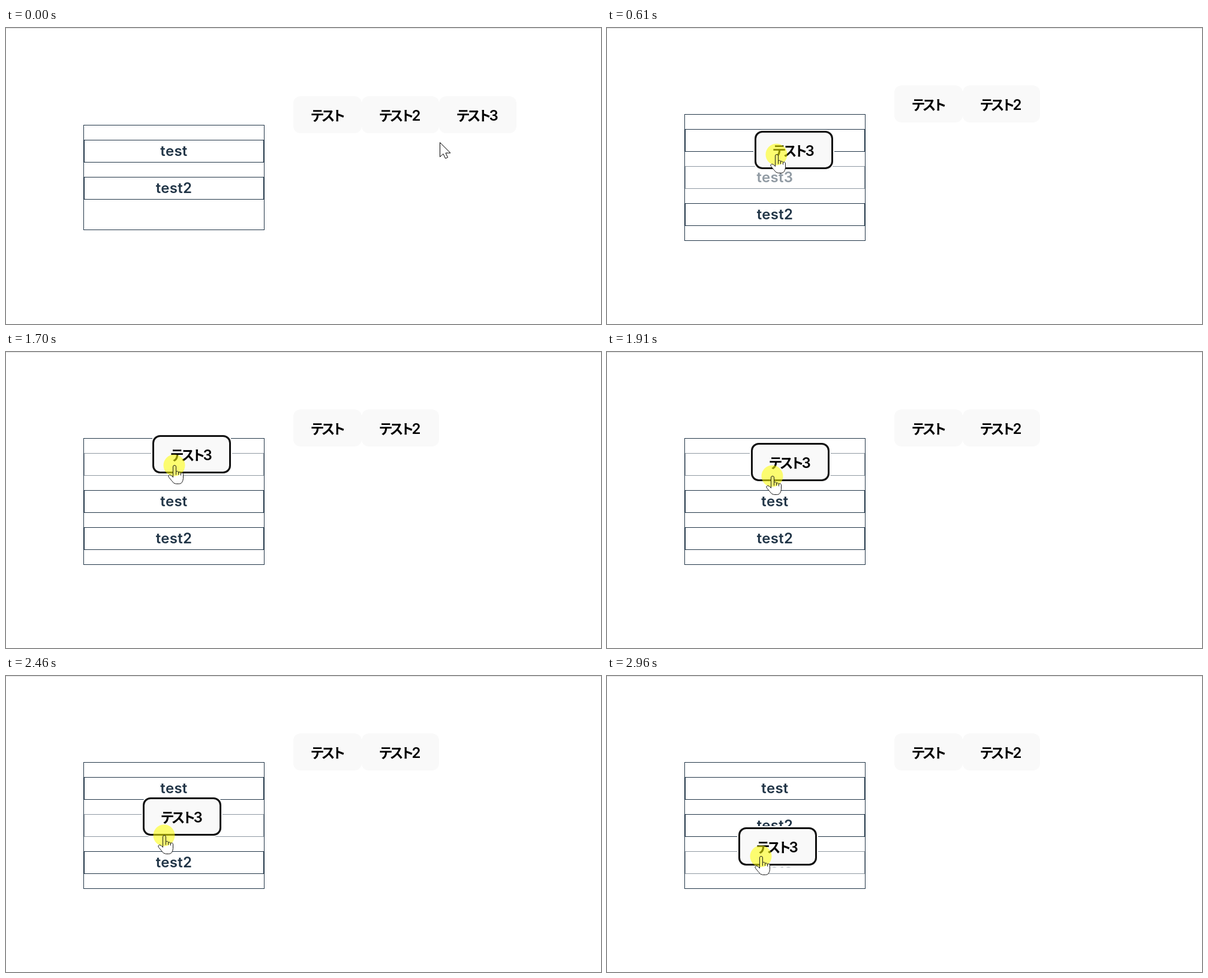
An HTML page with a canvas that plays this animation: 992x495 px, repeating every 3.28 s.

```html
<!DOCTYPE html>
<html lang="ja">
<head>
<meta charset="utf-8">
<title>Drag and drop list</title>
<style>
html, body { margin: 0; width: 100%; height: 100%; overflow: hidden; background: #fff; }
canvas { display: block; }
</style>
</head>
<body>
<canvas id="stage" width="992" height="495"></canvas>
<script>
const ctx = document.getElementById('stage').getContext('2d');
const LOOP = 3280;
const STEPS = 48;
const LEAD = 10;
const INK = '#213547';
const GRAB = { x: 36, y: 47 };
const ROW_STEP = 62;

// Where the pointer pauses or turns, timed in steps.
const stops = [
  { at: 0, x: 715, y: 174 },
  { at: 2, x: 303, y: 226 },
  { at: 4, x: 283, y: 220 },
  { at: 8, x: 283, y: 220 },
  { at: 11, x: 281, y: 187 },
  { at: 24, x: 281, y: 187 },
  { at: 31.6, x: 270, y: 225 },
  { at: 32, x: 270, y: 225 },
  { at: 39, x: 258, y: 292 },
  { at: 40, x: 258, y: 292 },
  { at: 42, x: 256, y: 301 }
];

const arrow = new Path2D('M0 0V24L5.5 19L9 26.5L13 25L9.5 17.5H17.5Z');
const hand = new Path2D(
  'M-2 20V2.5Q-2 0 .5 0Q3 0 3 2.5V11Q5 8.5 7 11V12Q9.5 10 11 13Q15 11.5 15 15.5V22' +
  'Q14 31 8 31H3Q-1 31 -4 26L-9 20Q-11 17 -8 16Q-5 15.5 -2 20Z');
const knuckles = new Path2D('M3 11V16M7 12V16M11 13V17');

const smooth = u => u * u * (3 - 2 * u);

function pointerAt(step) {
  const next = stops.findIndex(s => s.at > step);
  if (next < 0) return stops[stops.length - 1];
  const a = stops[next - 1];
  const b = stops[next];
  const k = smooth((step - a.at) / (b.at - a.at));
  return {
    x: Math.round(a.x + (b.x - a.x) * k),
    y: Math.round(a.y + (b.y - a.y) * k)
  };
}

function fillRound(x, y, w, h, r, color) {
  ctx.beginPath();
  ctx.roundRect(x, y, w, h, r);
  ctx.fillStyle = color;
  ctx.fill();
}

function frame(x, y, w, h) {
  ctx.strokeStyle = INK;
  ctx.lineWidth = 1;
  ctx.strokeRect(x + 0.5, y + 0.5, w - 1, h - 1);
}

function text(str, x, y, font, color, spacing = 0) {
  ctx.font = font;
  ctx.letterSpacing = spacing + 'px';
  ctx.fillStyle = color;
  ctx.fillText(str, x, y);
}

function row(y, label, alpha) {
  ctx.globalAlpha = alpha;
  frame(130, y, 300, 38);
  ctx.textAlign = 'center';
  text(label, 280, y + 27, '600 24px Inter, sans-serif', INK, 0.3);
  ctx.globalAlpha = 1;
}

function buttonText(x, y, digit) {
  ctx.textAlign = 'left';
  text('テスト', x + 28.5, y + 41, '700 23px "Noto Sans CJK JP", "Noto Sans CJK", sans-serif', '#000', -5);
  text(digit, x + 83.5, y + 41, '600 24px Inter, sans-serif', '#000');
}

function button(x, y, digit, alpha = 1) {
  ctx.globalAlpha = alpha;
  fillRound(x, y, digit ? 129 : 114, 62, 12, '#f9f9f9');
  buttonText(x, y, digit);
  ctx.globalAlpha = 1;
}

function draggedButton(x, y) {
  const ring = (grow, color) =>
    fillRound(x - grow, y - grow, 129 + 2 * grow, 62 + 2 * grow, 12 + grow, color);
  ring(3, '#fff');
  ring(1, '#101010');
  ring(-2, '#f9f9f9');
  buttonText(x, y, '3');
}

function drawArrow(x, y) {
  ctx.save();
  ctx.translate(x + 0.5, y + 0.5);
  ctx.fillStyle = '#fff';
  ctx.strokeStyle = '#000';
  ctx.lineWidth = 1;
  ctx.fill(arrow);
  ctx.stroke(arrow);
  ctx.restore();
}

function drawHand(x, y) {
  ctx.save();
  ctx.translate(x + 0.5, y + 0.5);
  ctx.fillStyle = '#fff';
  ctx.fill(hand);
  ctx.beginPath();
  ctx.arc(0, 0, 18, 0, Math.PI * 2);
  ctx.fillStyle = 'rgba(255, 255, 0, 0.55)';
  ctx.fill();
  ctx.strokeStyle = '#1a1a1a';
  ctx.lineWidth = 1;
  ctx.stroke(hand);
  ctx.stroke(knuckles);
  ctx.restore();
}

function draw(t) {
  const step = Math.floor((t + LEAD) / LOOP * STEPS) % STEPS;
  const dragging = step > 0 || t > LOOP / 2;
  const shown = dragging && step === 0 ? STEPS - 1 : step;
  const pointer = pointerAt(shown);
  // The dragged button trails the pointer by one step.
  const lag = pointerAt(Math.max(shown - 1, 0));
  const drag = { x: lag.x - GRAB.x, y: lag.y - GRAB.y };
  const inList = dragging && drag.x < 431;
  const top = inList ? 144 : 162;

  ctx.fillStyle = '#fff';
  ctx.fillRect(0, 0, 992, 495);
  ctx.fillStyle = '#e0e0e0';
  ctx.fillRect(0, 0, 992, 1);

  const labels = ['test', 'test2'];
  if (inList) {
    const slot = [169, 231].filter(y => drag.y > y).length;
    labels.splice(slot, 0, 'test3');
  }
  frame(129, top, 302, inList ? 212 : 176);
  labels.forEach((label, i) =>
    row(top + 25 + i * ROW_STEP, label, label === 'test3' ? 0.5 : 1));

  const trayY = top - 48;
  button(479, trayY, '');
  button(593, trayY, '2');
  if (!inList) button(722, trayY, '3', dragging ? 0.5 : 1);

  if (dragging) {
    draggedButton(drag.x, drag.y);
    drawHand(pointer.x, pointer.y);
  } else {
    drawArrow(723, 191);
  }
}

const start = performance.now();
function tick() {
  draw((performance.now() - start) % LOOP);
  requestAnimationFrame(tick);
}
tick();
</script>
</body>
</html>
```
